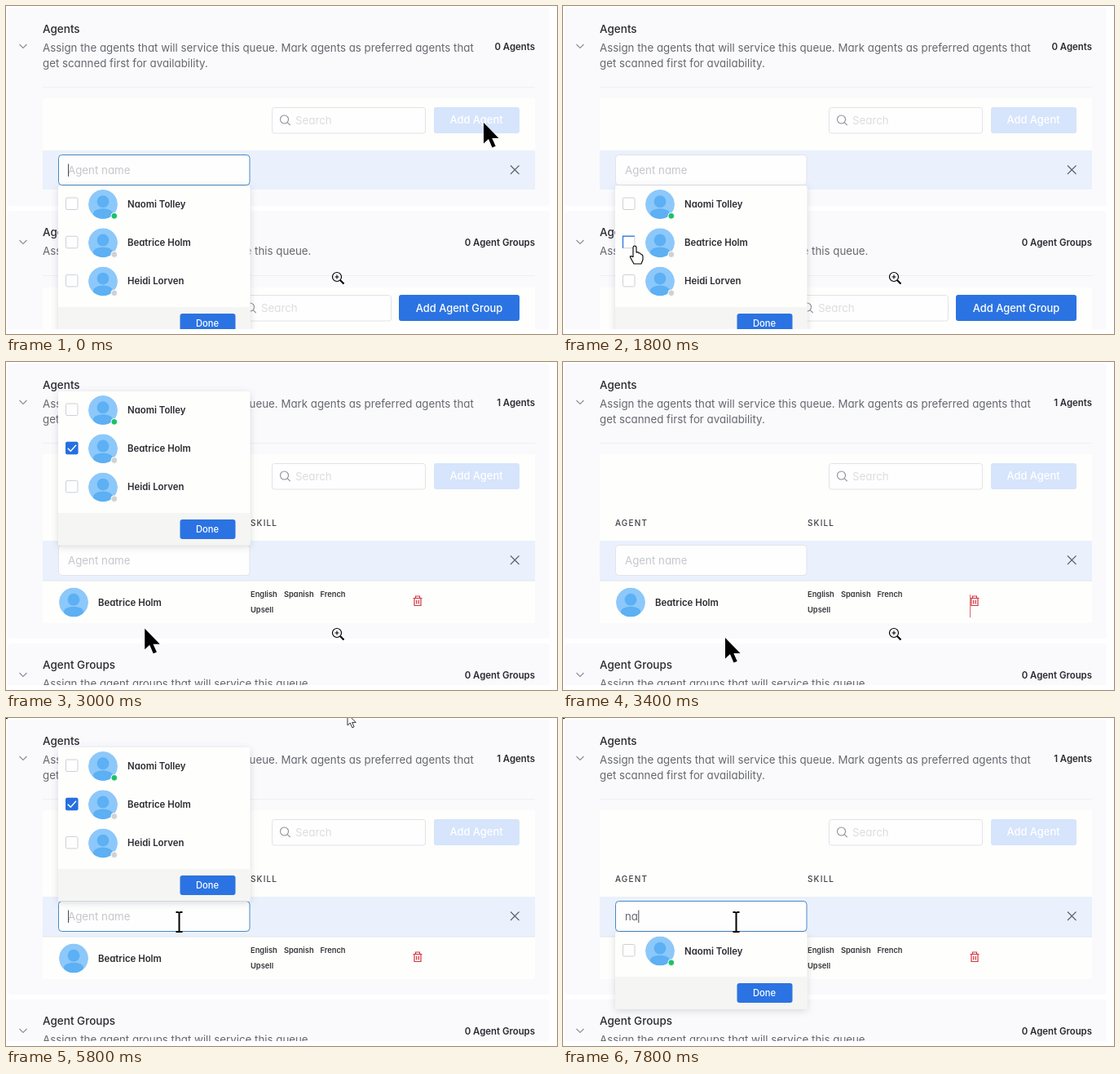
Animation of 676x402 px, one loop 8 s. Source, as an HTML page:

```html
<!DOCTYPE html>
<html lang="en">
<head>
<meta charset="utf-8">
<title>Queue agents</title>
<style>
  html, body { margin: 0; width: 100%; height: 100%; overflow: hidden; background: #fff; }
  svg { display: block; width: 676px; height: 402px; }
  text { font: 400 13.3px Inter, "Open Sans", sans-serif; font-feature-settings: "cv11"; fill: #66686f; }
  .title { font-weight: 500; font-size: 13.5px; fill: #2a2b31; }
  .count, .name { font-weight: 600; font-size: 11.4px; fill: #2a2b31; }
  .count { text-anchor: end; }
  .head { font-weight: 500; font-size: 10px; letter-spacing: 1.15px; fill: #3c3e45; }
  .skill { font-weight: 600; font-size: 9.3px; fill: #33343a; }
  .button { font-weight: 500; font-size: 12.9px; fill: #fff; text-anchor: middle; }
  .done { font-size: 11.2px; }
  .hint { fill: #c6c7cc; }
  .search { fill: #dcdde1; }
  .panel { fill: #fafafd; }
  .card { fill: #fefefc; }
  .rule { stroke: #efeff3; }
  .box { fill: #fefefe; stroke: #e1e3e8; }
  .check { fill: #fefefe; stroke: #cdd0d6; }
  .icon { fill: none; stroke: #5c5e66; stroke-width: 1.1; }
  .faint { stroke: #8c8e96; }
  .line { fill: none; }
  #field.focus { stroke: #4a88c4; }
  #menu { filter: drop-shadow(0 2px 4px rgba(40, 45, 60, .17)); }
</style>
</head>
<body>
<svg viewBox="0 0 676 402">
  <defs>
    <clipPath id="screen"><rect width="676" height="396"/></clipPath>
    <clipPath id="disc"><circle r="18"/></clipPath>
    <g id="avatar" clip-path="url(#disc)">
      <circle r="18" fill="#8dc8fb"/>
      <circle cy="-3.3" r="7.4" fill="#5cb0f3"/>
      <ellipse cy="11.5" rx="12" ry="6.3" fill="#5cb0f3"/>
    </g>
    <g id="lens" class="icon faint">
      <circle cx="-1" cy="-1" r="5"/><path d="M2.7 2.7 6.2 6.2"/>
    </g>
    <path id="chevron" class="icon faint" d="M-4.5-2 0 2.5 4.5-2"/>
    <path id="arrow" d="M0 0V25.5L6 20 10.5 30.5 14.7 28.7 10.3 19H18.5Z"/>
  </defs>

  <g clip-path="url(#screen)">
    <rect id="upperPanel" class="panel" x="2" y="2" width="665" rx="4"/>
    <use href="#chevron" x="21" y="49"/>
    <text class="title" x="45" y="32.5">Agents</text>
    <text x="45" y="56">Assign the agents that will service this queue. Mark agents as preferred agents that</text>
    <text x="45" y="75">get scanned first for availability.</text>
    <text id="count" class="count" x="649" y="53.5"></text>
    <path class="rule" d="M45 99.5H649"/>
    <rect id="upperCard" class="card" x="45" y="113" width="604"/>
    <rect class="box" x="326.5" y="124.5" width="188" height="31.5" rx="3"/>
    <use href="#lens" x="342.5" y="140"/>
    <text class="search" x="355" y="144.5">Search</text>
    <rect x="525" y="124" width="105" height="32" rx="3" fill="#d6e4fc"/>
    <text class="button" x="577" y="144">Add Agent</text>

    <g id="table">
      <text class="head" x="64" y="200.5">AGENT</text>
      <text class="head" x="300" y="200.5">SKILL</text>
      <use href="#avatar" x="83" y="294.5"/>
      <text class="name" x="113" y="298.5">Beatrice Holm</text>
      <text class="skill" x="300" y="288">English</text>
      <text class="skill" x="341" y="288">Spanish</text>
      <text class="skill" x="385.5" y="288">French</text>
      <text class="skill" x="300" y="307">Upsell</text>
      <path fill="none" stroke="#d2333f" stroke-width="1.2" d="M499.5 289.5H510.5M502.5 289V287H507.5V289M501 290V298.5H509V290M503.7 292V296.5M506.3 292V296.5"/>
      <path id="redLine" stroke="#d96a72" d="M499.5 285V313"/>
    </g>

    <g id="lower">
      <rect class="panel" x="2" y="251" width="665" height="160" rx="4"/>
      <use href="#chevron" x="21" y="289"/>
      <text class="title" x="45" y="281.5">Agent Groups</text>
      <text x="45" y="305">Assign the agent groups that will service this queue.</text>
      <text class="count" x="649" y="293.5">0 Agent Groups</text>
      <path class="rule" d="M45 330.5H649"/>
      <rect class="card" x="45" y="345" width="604" height="60"/>
      <rect class="box" x="284.5" y="354.5" width="188" height="31.5" rx="3"/>
      <use href="#lens" x="300.5" y="370"/>
      <text class="search" x="313" y="374.5">Search</text>
      <rect x="482" y="354" width="148" height="32" rx="3" fill="#2b73e2"/>
      <text class="button" x="556" y="374.5">Add Agent Group</text>
    </g>

    <g id="entry">
      <rect id="band" x="45" y="177" width="604" fill="#eaf1fc"/>
      <path id="bandEdge" d="M45 226H649" stroke="#e1e5ed"/>
      <rect id="field" class="box" x="64.5" y="182.5" width="234.5" height="37" rx="4"/>
      <text id="value" x="76" y="206"></text>
      <path id="caret" d="M0 193.5V209" stroke="#4a4c54"/>
      <path class="icon" d="M619 195.5 629.5 206M629.5 195.5 619 206"/>
    </g>

    <g id="menu">
      <rect id="menuBody" x="64" width="235.5" rx="3" fill="#fefefd"/>
      <g id="rows"></g>
      <g id="footer">
        <rect x="64" width="235.5" height="39.5" fill="#f5f5f4"/>
        <rect x="213.5" y="8" width="68" height="24" rx="3" fill="#2b73e2"/>
        <text class="button done" x="247" y="24">Done</text>
      </g>
    </g>
  </g>

  <g id="zoomCursor" fill="none" stroke="#000">
    <path d="M410 336 414 340" stroke="#fff" stroke-width="5"/>
    <circle cx="406" cy="332" r="5.5" fill="#fff" stroke-width="1.2"/>
    <path d="M403.5 332H408.5M406 329.5V334.5" stroke-width="1.1"/>
    <path d="M410 336 414.5 340.5" stroke-width="2.2"/>
  </g>
  <rect id="corner" width="2" height="1"/>
  <g id="smallCursor">
    <use href="#arrow" transform="scale(.55)" fill="#fff" stroke="#333" stroke-width="1.8"/>
  </g>
  <g id="pointer">
    <use id="arrowCursor" href="#arrow"/>
    <path id="handCursor" fill="#fff" stroke="#000" stroke-width="1.1" stroke-linejoin="round"
      d="M-2 1.500Q-2-1 0-1Q2-1 2 1.500V7Q4.500 6 5 8Q7.500 7.500 7.800 9.500Q10 9.500 10 12V16L8 21H-1L-5.500 13Q-6 10.500-2 12.500Z"/>
    <path id="beamCursor" fill="none" stroke="#000" stroke-width="2" d="M-4-12H-1.500L0-11 1.500-12H4M0-11V11M-4 12H-1.500L0 11 1.500 12H4"/>
  </g>
</svg>
<script>
const $ = id => document.getElementById(id);
const show = (id, on) => $(id).style.display = on ? '' : 'none';
const move = (id, x, y) => $(id).setAttribute('transform', `translate(${x} ${y})`);
const LOOP = 8000, STEP = 200, ROW = 47.2;
const people = [['Naomi Tolley', '#1fc06a'], ['Beatrice Holm', '#d0d1d3'], ['Heidi Lorven', '#d0d1d3']];

$('rows').innerHTML = people.map(([name, status], i) => `
  <g id="row${i}" transform="translate(0 ${22.5 + i * ROW})">
    <rect class="check" x="73.5" y="-7.5" width="14.5" height="14.5" rx="1.5"/>
    <use href="#avatar" x="119" y="0.5"/>
    <circle cx="132.8" cy="14.8" r="3.9" fill="${status}" stroke="#fff" stroke-width="1"/>
    <text class="name" x="149" y="4.5">${name}</text>
  </g>`).join('');
$('row1').insertAdjacentHTML('beforeend', `
  <path id="pressed" class="line" d="M73.5 7V-7.5H88" stroke="#2b73e2" stroke-width="1.3"/>
  <g id="checked"><rect x="73" y="-8" width="15.5" height="15.5" rx="2" fill="#2570e0"/>
  <path class="line" d="M75.8 0 79.3 3.5 86-4" stroke="#fff" stroke-width="1.4"/></g>`);

// Pointer stops: [time, x, y]
const route = [
  [0, 586, 143], [1200, 88, 295], [2600, 88, 295], [3200, 199, 338],
  [5000, 199, 338], [5600, 212.5, 250], [LOOP, 212.5, 250]
];
const exitRoute = [[0, 406, 332], [5200, 406, 332], [5800, 419, -5], [LOOP, 419, -5]];
const ease = p => p * p * (3 - 2 * p);

function along(stops, t) {
  const i = stops.findIndex(stop => stop[0] > t);
  const [t0, x0, y0] = stops[i - 1], [t1, x1, y1] = stops[i];
  const p = ease((t - t0) / (t1 - t0));
  return [x0 + (x1 - x0) * p, y0 + (y1 - y0) * p];
}

function placeMenu(top, rows) {
  const footer = 7.4 + rows * ROW;
  move('menu', 0, top);
  move('footer', 0, footer);
  $('menuBody').setAttribute('height', footer + 39.5);
  show('row1', rows > 1);
  show('row2', rows > 1);
}

function render(t) {
  const within = (from, to = LOOP) => t >= from && t < to;
  const added = t >= 2000, filtered = t >= 7600;
  const focused = within(0, 1400) || within(5600);
  const typed = t >= 7400 ? 'na' : t >= 7200 ? 'n' : '';

  $('count').textContent = added ? '1 Agents' : '0 Agents';
  $('upperPanel').setAttribute('height', added ? 337 : 243);
  $('upperCard').setAttribute('height', added ? 207 : 112);
  show('table', added);
  show('bandEdge', added);
  $('band').setAttribute('height', added ? 49 : 48);
  move('entry', 0, added ? 42 : 0);
  move('lower', 0, added ? 94 : 0);

  show('menu', within(0, 3200) || within(5600));
  placeMenu(filtered ? 262.5 : added ? 36 : 220, filtered ? 1 : people.length);
  show('pressed', within(1600, 2000));
  show('checked', added);

  const value = $('value');
  value.textContent = typed || 'Agent name';
  value.setAttribute('class', typed ? '' : 'hint');
  $('field').classList.toggle('focus', focused);
  const caretX = typed ? 76 + value.getComputedTextLength() + .8 : 76.5;
  move('caret', caretX, 0);
  show('caret', focused && !within(400, 1000) && !within(6200, 6800));

  show('redLine', within(3200, 4800));
  show('corner', within(3800));
  show('zoomCursor', within(0, 5400));
  show('smallCursor', within(5400, 6000));
  move('smallCursor', ...along(exitRoute, t));

  const hand = within(1200, 2000), beam = within(5600);
  move('pointer', ...along(route, t));
  show('handCursor', hand);
  show('beamCursor', beam);
  show('arrowCursor', !hand && !beam);
}

const start = performance.now();
function tick() {
  const t = (performance.now() - start) % LOOP;
  render(Math.floor(t / STEP) * STEP);
  requestAnimationFrame(tick);
}
tick();
</script>
</body>
</html>
```
